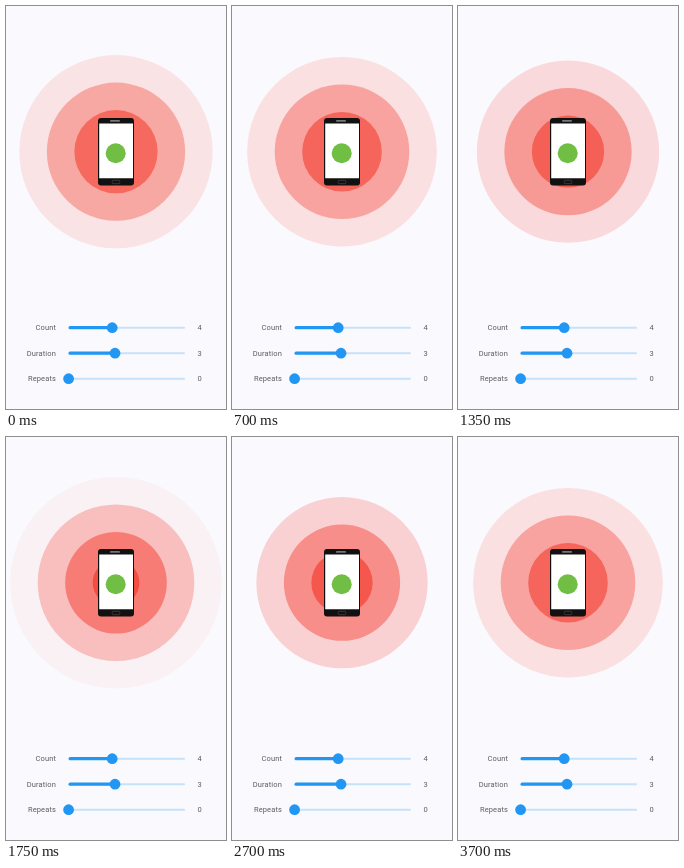
These frames come from a looping animation (220 by 403 pixels, 3750 ms). An HTML page with a canvas:

```html
<!DOCTYPE html>
<html lang="en">
<head>
<meta charset="utf-8">
<title>Pulse</title>
<style>
  html, body { margin: 0; width: 100%; height: 100%; overflow: hidden; background: #faf9fd; }
  canvas { display: block; width: 220px; height: 403px; }
</style>
</head>
<body>
<canvas id="stage"></canvas>
<script>
const WIDTH = 220, HEIGHT = 403;
const LOOP = 3750, STEP = 50;
const RINGS = 4, RING_LIFE = 3000, MAX_RADIUS = 110;
const START_PHASE = 0.8785;
const CENTER = { x: 110, y: 145.7 };
const TRACK = { left: 63, right: 179 };
const BLUE = '#2196f3';

const sliders = [
  { label: 'Count', value: '4', y: 321.7, thumb: 106.2 },
  { label: 'Duration', value: '3', y: 347.2, thumb: 109 },
  { label: 'Repeats', value: '0', y: 372.7, thumb: 62.6 }
];

const canvas = document.getElementById('stage');
const ctx = canvas.getContext('2d');
const ratio = window.devicePixelRatio || 1;
canvas.width = Math.round(WIDTH * ratio);
canvas.height = Math.round(HEIGHT * ratio);
ctx.scale(ratio, ratio);

function circle(x, y, radius, color) {
  ctx.fillStyle = color;
  ctx.beginPath();
  ctx.arc(x, y, radius, 0, Math.PI * 2);
  ctx.fill();
}

function box(x, y, w, h, radius, color) {
  ctx.fillStyle = color;
  ctx.beginPath();
  ctx.roundRect(x, y, w, h, radius);
  ctx.fill();
}

// Each ring grows linearly from nothing while fading out.
function drawRings(time) {
  const phases = Array.from({ length: RINGS },
    (_, i) => (START_PHASE + time / RING_LIFE + i / RINGS) % 1);
  phases.sort((a, b) => b - a);
  for (const p of phases) {
    circle(CENTER.x, CENTER.y, p * MAX_RADIUS, `rgba(244, 67, 54, ${1 - p})`);
  }
}

function drawPhone() {
  box(92, 112, 36, 67.5, 3, '#111');
  box(93.2, 117.5, 33.8, 54.7, 0, '#fff');
  box(104, 114, 10, 1.8, 0.9, '#777');
  ctx.strokeStyle = '#484848';
  ctx.lineWidth = 0.7;
  ctx.beginPath();
  ctx.roundRect(106.2, 174.3, 7.6, 3.4, 1);
  ctx.stroke();
  circle(109.7, 147.3, 10, '#70be44');
}

function drawSlider({ label, value, y, thumb }) {
  box(TRACK.left, y - 1.05, TRACK.right - TRACK.left, 2.1, 1.05, '#c6e1fa');
  if (thumb > TRACK.left) box(TRACK.left - 0.5, y - 1.6, thumb - TRACK.left, 3.2, 1.6, BLUE);
  circle(thumb, y, 5.4, BLUE);

  ctx.fillStyle = '#5c5c5f';
  ctx.font = '7.5px Roboto, sans-serif';
  ctx.letterSpacing = '0.13px';
  ctx.textAlign = 'right';
  ctx.fillText(label, 50, y + 2.6);
  ctx.textAlign = 'left';
  ctx.fillText(value, 191.6, y + 2.6);
}

function draw() {
  const time = Math.floor((performance.now() - start) % LOOP / STEP) * STEP;
  ctx.fillStyle = '#faf9fd';
  ctx.fillRect(0, 0, WIDTH, HEIGHT);
  drawRings(time);
  drawPhone();
  sliders.forEach(drawSlider);
  requestAnimationFrame(draw);
}

const start = performance.now();
draw();
</script>
</body>
</html>
```
